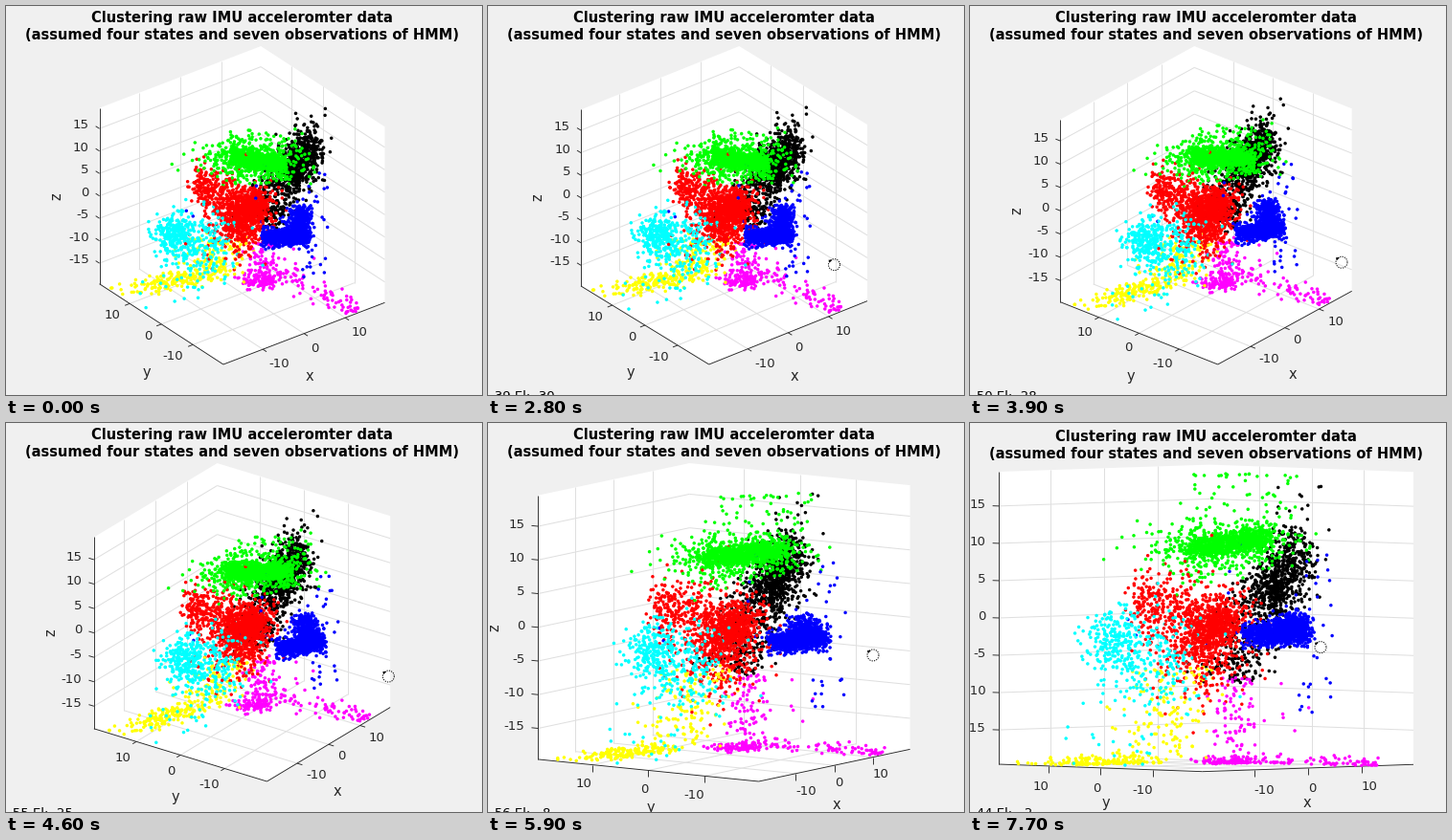
Animation of 497 by 407 pixels, one loop 8 s. Source, as a matplotlib script:

```python
import numpy as np
import matplotlib
import matplotlib.pyplot as plt
from matplotlib.animation import FuncAnimation
from matplotlib.collections import LineCollection
from matplotlib.patches import Polygon

W, H, DPI = 497, 407, 64
PT = 72 / DPI                      # points per pixel
L = 19.6                           # sensor range, m/s^2
AZ0 = np.radians(-37.5)
INK = '#262626'
STEP = 100

rng = np.random.default_rng(4)
N = rng.normal
U = rng.uniform


# --- Data: rows are (across, depth, height) as seen from AZ0 ---
def blob(n, mean, std):
    return np.array([N(m, s, n) for m, s in zip(mean, std)])


def green():
    h = 3.2 + 5.8 * np.sin(U(-1.5, 1.5, 850)) * U(.3, 1, 850)
    core = [h, -.7 * (h - 3.3) + N(0, 1, 850), 10 + .18 * (h - 3.3) + N(0, .8, 850)]
    z = np.minimum(U(12, 22, 50), L - U(0, .5, 50))
    high = [U(-4, 12, 50), -.7 * (z - 10) + N(0, 1.5, 50), z]
    return np.hstack([core, high, blob(240, (-1, 1.5, 9), (3.2, 2.3, 2.2)),
                      blob(150, (6, -2, 10), (3.5, 2.5, 2))])


def black():
    z = N(5.2, 3, 560)
    core = [11 + .25 * (z - 5) + N(0, 1.9, 560), 8 + N(0, 2, 560), z]
    z = U(-9, 5, 330)
    tail = [7.2 + .4 * z + N(0, 2.6, 330), 8 + N(0, 2, 330), z]
    return np.hstack([core, tail, blob(22, (13.5, 6.5, 12), (1.8, 1.5, 3.2))])


def red():
    h = N(.9, 2, 520)
    core = [h, N(0, 2, 520), -1.4 + .3 * h + N(0, 1.6, 520)]
    return np.hstack([core, blob(480, (-.2, 0, -3), (3.2, 3, 3.9)),
                      blob(110, (-7.4, 4.5, 2), (1.1, 1.2, 2.3)),
                      blob(110, (-4, 2.5, 1), (2, 2, 2.8))])


def blue():
    h = 8.3 + 4.9 * np.sin(U(-1.5, 1.5, 800)) * U(.2, 1, 800)
    base = [h, -9 + N(0, .9, 800), -1.8 + N(0, .8, 800)]
    t = U(0, 1, 420)
    column = [11.2 + N(0, 1, 420), -9 + 8 * t, -1.8 + 1.6 * t + N(0, .8, 420)]
    stray = [U(11, 16.5, 34), N(-6, 2.5, 34), U(-14, 9, 34)]
    return np.hstack([base, column, stray, blob(12, (3, -3, -1), (5, 3, 4))])


def cyan():
    return np.hstack([blob(220, (-13, -6.5, -2.5), (2, 1.8, 2.1)),
                      blob(190, (-7.5, -5, -5.8), (3.2, 2.4, 3.2)),
                      blob(30, (-12, -2, -14), (3, 2, 4))])


def yellow():
    h = N(-13.5, 4.3, 150)
    floor = [h, 3.5 + .3 * (h + 15) + N(0, 1.6, 150), N(-19.4, .4, 150)]
    z = U(-19, -6.5, 140)
    rise = [-5.5 + .3 * (z + 13) + N(0, 3.2, 140),
            1.5 - .5 * (z + 13) + N(0, 1.5, 140), z]
    return np.hstack([floor, rise])


def magenta():
    z = U(-18, -8, 75)
    rise = [4 + N(0, 1.7, 75), .5 - .35 * (z + 12) + N(0, 1.2, 75), z]
    h = U(7, 22.5, 75)
    tail = [h, 4 - (h - 11) + N(0, 2.2, 75), N(-19.4, .5, 75)]
    return np.hstack([blob(110, (3.4, 4.4, -19.4), (2.3, 1.5, .3)), rise, tail,
                      blob(7, (11, 0, -13), (3, 2, 4))])


groups = [('lime', green()), ('black', black()), ('red', red()), ('blue', blue()),
          ('cyan', cyan()), ('yellow', yellow()), ('magenta', magenta())]
across, depth0, height = np.hstack([g for _, g in groups])
rgba = np.vstack([np.tile(matplotlib.colors.to_rgba(c), (g.shape[1], 1))
                  for c, g in groups])
c0, s0 = np.cos(AZ0), np.sin(AZ0)
pts = np.clip(np.array([c0 * across - s0 * depth0,
                        s0 * across + c0 * depth0, height]).T, -L, L)

# --- Timing: the picture holds between these moments ---
moments = np.unique(np.r_[0, 500:1400:100, 1700, 2300, 2600:3200:100,
                          3500:4200:100, 4300:5000:300, 4400:5100:300,
                          5200:5700:200, 5900:7200:200, 6600, 7400:7800:300])
DRAG = 2500, 3500, 4100, 5000, 6500, 7700


def angles(t):
    az = np.interp(t, DRAG, [-37.5, -42.4, -53.2, -55.6, -55.5, -44])
    el = np.interp(t, [2500, 3500, 4600, 5900, 6900, 7700],
                   [30, 29.2, 25.4, 8.4, 3.6, 2])
    return az, el


def pointer(t, el):
    if t < 500:
        return -50, -50
    if t < 1700:
        path = 500, 1100, 1300
        return np.interp(t, path, [487, 396, 378]), np.interp(t, path, [32, 288, 276])
    return (np.interp(t, DRAG, [357, 372, 396, 402, 402, 366]),
            271 - (30 - el) / .77)


# --- Stage ---
fig = plt.figure(figsize=(W / DPI, H / DPI), dpi=DPI, facecolor='#f0f0f0')
ax = fig.add_axes([0, 0, 1, 1])
ax.set(xlim=(0, W), ylim=(H, 0))
ax.axis('off')


def label(txt='', size=13.3, **kw):
    opts = dict(ha='center', va='center', color=INK, family='DejaVu Sans')
    return ax.text(0, 0, txt, fontsize=size * PT, **{**opts, **kw})


walls = ax.add_patch(Polygon(np.zeros((6, 2)), fc='white', ec='none', zorder=0))
grid = ax.add_collection(LineCollection([], colors='#dfdfdf', lw=PT, zorder=1))
rules = ax.add_collection(LineCollection([], colors=INK, lw=PT * .9, zorder=2))
dots = ax.scatter(*np.zeros((2, len(pts))), s=(3.5 * PT) ** 2, lw=0, zorder=3)

heads = [label(s, 14.67, weight='bold', color='black', va='baseline') for s in
         ('Clustering raw IMU acceleromter data',
          '(assumed four states and seven observations of HMM)')]
xy_ticks, z_ticks = (-10, 0, 10), range(-15, 20, 5)
x_nums = [label(str(v), ha='left') for v in xy_ticks]
y_nums = [label(str(v), ha='right') for v in xy_ticks]
z_nums = [label(str(v), ha='right') for v in z_ticks]
x_name, y_name = label('x', 14.67), label('y', 14.67)
z_name = label('z', 14.67, rotation=90)
readout = label(ha='left', va='baseline', color='black')
readout.set_position((2, 412))

ring = np.linspace(0, 2 * np.pi, 60)
ring_line, = ax.plot([], [], color='black', lw=PT, ls=(0, (1.2, 1.2)), zorder=6)
ring_tip = ax.add_patch(Polygon(np.zeros((3, 2)), fc='black', ec='none', zorder=6))


def camera(az, el):
    a, e = np.radians(az), np.radians(el)
    ca, sa, ce, se = np.cos(a), np.sin(a), np.cos(e), np.sin(e)
    wide = abs(ca) + abs(sa)
    tall = ce + wide * se
    side = min(433 / wide, 333 / tall)      # cube fitted into 433 x 333
    scale = side / (2 * L)
    cy = 208.5 - .37 * (333 - side * tall)

    def project(p):
        x, y, z = np.asarray(p, float).T
        d = -sa * x + ca * y
        xy = np.array([246.5 + scale * (ca * x + sa * y),
                       cy - scale * (ce * z + se * d)]).T
        return xy, d * ce - z * se
    return project


def draw(i):
    t = moments[moments <= i * STEP].max()
    az, el = angles(t)
    project = camera(az, el)

    def at(*p):
        return project([p])[0][0]

    def seg(a, b):
        return [at(*a), at(*b)]

    left, front, right = at(-L, L, -L), at(-L, -L, -L), at(L, -L, -L)
    walls.set_xy([at(-L, L, L), at(L, L, L), at(L, -L, L), right, front, left])
    lines = []
    for v in xy_ticks:
        lines += [seg((v, -L, -L), (v, L, -L)), seg((v, L, -L), (v, L, L)),
                  seg((-L, v, -L), (L, v, -L)), seg((L, v, -L), (L, v, L))]
    for v in z_ticks:
        lines += [seg((-L, L, v), (L, L, v)), seg((L, L, v), (L, -L, v))]
    grid.set_segments(lines)

    # floor ticks point straight down in flat views
    flat = el < 15
    sx = (front - right)[1] / np.hypot(*(front - right))
    sy = (front - left)[1] / np.hypot(*(front - left))
    out = L * 1.06
    marks = [[left, front], [front, right], [left, at(-L, L, L)]]
    for v, tx, ty in zip(xy_ticks, x_nums, y_nums):
        px, py = at(v, -L, -L), at(-L, v, -L)
        marks.append([px, px + (0, 7) if flat else at(v, -out, -L)])
        marks.append([py, py + (0, 7) if flat else at(-out, v, -L)])
        tx.set_position(px + (0 if flat else 18 * sx, 22 - 18 * sx))
        ty.set_position(py + (0 if flat else -18 * sy, 22 - 18 * sy))
    for v, tz in zip(z_ticks, z_nums):
        marks.append(seg((-L, L, v), (-L, out, v)))
        tz.set_position(at(-L, out, v) + (-7, -1))
    rules.set_segments(marks)
    x_name.set_position(at(0, -L, -L) + (22 * sx - 2, 36 + 26 * sx))
    y_name.set_position(at(-L, 0, -L) + (7 - 41 * sy, 36 + 26 * sy))
    z_name.set_position(at(-L, L, 0) + (-45, 0))

    xy, depth = project(pts)
    order = np.argsort(-depth)
    dots.set_offsets(xy[order])
    dots.set_facecolors(rgba[order])

    lift = np.interp(t, [6800, 6900, 7400], [0, -2, 2])
    for n, head in enumerate(heads):
        head.set_position((246, 17 + 18 * n + lift))
    readout.set_text(f'{az:.0f} El: {el:3.0f}' if t > DRAG[0] else '')

    cx, cy = pointer(t, el)
    ring_line.set_data(cx + 6 * np.cos(ring), cy + 6 * np.sin(ring))
    ring_tip.set_xy([(cx - 6, cy - 5), (cx - 2, cy - 5), (cx - 5, cy - 2)])
    return []


anim = FuncAnimation(fig, draw, frames=80, interval=STEP, repeat=True,
                     repeat_delay=0, blit=False)
plt.show()
```
